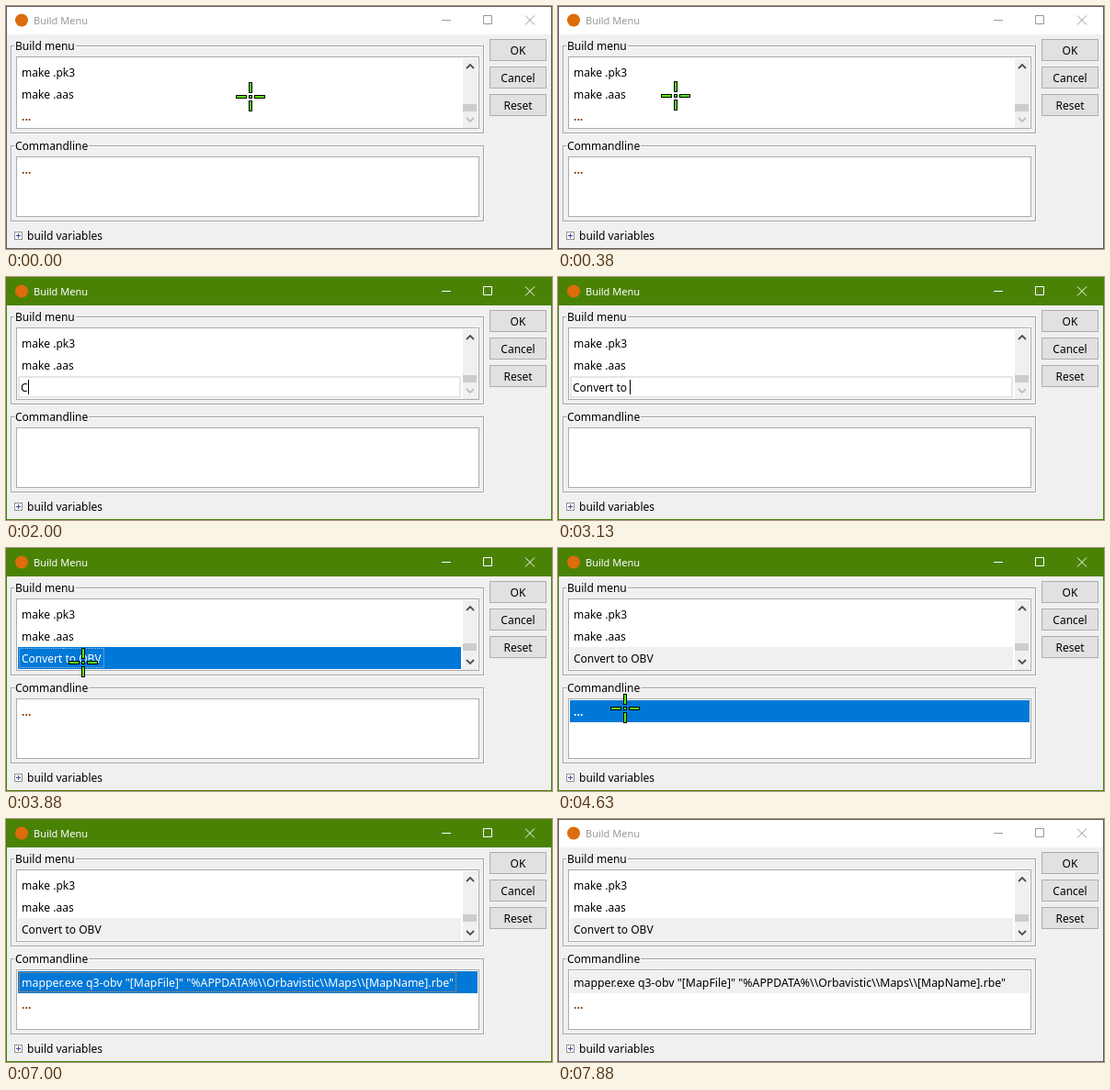
Animation, 594 px wide and 265 px high, one loop 8010 ms. Source, as an HTML page:

```html
<!DOCTYPE html>
<html lang="en">
<head>
<meta charset="utf-8">
<title>Build Menu</title>
<style>
html, body { margin: 0; width: 100%; height: 100%; overflow: hidden; }
svg { display: block; width: 594px; height: 265px; background: #f0f0f0; font: 12px "Noto Sans", "Open Sans", sans-serif; }
rect { shape-rendering: crispEdges; }
.mid { text-anchor: middle; }

.bar { fill: #fff; }
.edge { fill: none; stroke: #5c5c60; }
.name { fill: #999; font-size: 11px; }
.ctl { fill: none; stroke: #999; }
.on .bar { fill: #4a8206; }
.on .edge { stroke: #4a8206; }
.on .name { fill: #fff; }
.on .ctl { stroke: #fff; }

.etch { fill: none; stroke: #a3a3a3; }
.etch.lit { stroke: #fff; }
.gap { fill: #f0f0f0; }
.list { fill: #fff; stroke: #a9abb0; }
.btn { fill: #e1e1e1; stroke: #adadad; }
.arrow { fill: none; stroke: #505050; stroke-width: 1.8; }
.arrow.off { stroke: #bfbfbf; }

.bg { fill: none; }
.ring, .caret { display: none; }
.ring rect, rect.ring { fill: none; }
.dots { fill: #853c00; font-weight: bold; }
.pick .bg { fill: #0078d7; }
.pick text { fill: #fff; }
.dim .bg { fill: #f0f0f0; }
.edit .bg { fill: #fff; stroke: #e6e6e6; stroke-width: 2; }
.edit .caret { display: inline; }
.focus .ring { display: inline; stroke-dasharray: 1 1; }
.cmd text { font-size: 12.3px; }
</style>
</head>
<body>
<svg viewBox="0 0 594 265">
  <g id="win">
    <rect class="bar" width="594" height="31"/>
    <circle cx="17" cy="15.5" r="7" fill="#dc6c0c"/>
    <text class="name" x="30" y="20">Build Menu</text>
    <path class="ctl" d="M474 15.5h10M519.5 10.5h9v9h-9zM565 10.5l10 10m0-10l-10 10"/>
    <rect class="edge" x=".5" y=".5" width="593" height="264"/>
  </g>
  <g id="body"></g>
  <g id="rows"></g>
  <g id="pointer"></g>
</svg>
<script>
const $ = id => document.getElementById(id);

function add(parent, tag, attrs, text) {
  const el = document.createElementNS('http://www.w3.org/2000/svg', tag);
  for (const k in attrs) el.setAttribute(k, attrs[k]);
  if (text) el.textContent = text;
  return parent.appendChild(el);
}

const rect = (parent, cls, x, y, width, height) =>
  add(parent, 'rect', { class: cls, x, y, width, height });

// Static parts of the dialog
const body = $('body');

function group(label, y, h) {
  rect(body, 'etch lit', 6.5, y + 1.5, 514, h);
  rect(body, 'etch', 5.5, y + 0.5, 514, h);
  const gap = rect(body, 'gap', 9, y - 4, 0, 10);
  const text = add(body, 'text', { x: 10, y: y + 5 }, label);
  gap.setAttribute('width', text.getComputedTextLength() + 2);
  rect(body, 'list', 11.5, y + 12.5, 503, h - 17);
}

group('Build menu', 43, 95);
group('Commandline', 152, 82);

['OK', 'Cancel', 'Reset'].forEach((label, i) => {
  rect(body, 'btn', 526.5, 36.5 + i * 30, 61, 23);
  add(body, 'text', { class: 'mid', x: 557, y: 53 + i * 30 }, label);
});

rect(body, 'gap', 497, 57, 16, 76);
const thumb = add(body, 'rect', { x: 497, width: 15, height: 8, fill: '#cdcdcd' });
add(body, 'path', { class: 'arrow', d: 'M501 68l4-4 4 4' });
const down = add(body, 'path', { d: 'M501 122l4 4 4-4' });

add(body, 'rect', { x: 9.5, y: 246.5, width: 8, height: 8, fill: '#fff', stroke: '#919191' });
add(body, 'path', { d: 'M11 250.5h5M13.5 248v5', stroke: '#3c50a0' });
add(body, 'text', { x: 23, y: 255 }, 'build variables');

// List rows: a state is a set of class names plus the text
function makeRow(y, width, kind, ringColor) {
  const g = add($('rows'), 'g', {});
  const bg = rect(g, 'bg', 13, y, width, 24);
  const label = add(g, 'text', { y: y + 17 });
  const ring = rect(g, 'ring', 14.5, y + 1.5, 0, 21);
  ring.setAttribute('stroke', ringColor);
  const caret = rect(g, 'caret', 16, y + 4, 1, 16);
  let last;
  return (text, mode = '') => {
    if (last === text + mode) return;
    last = text + mode;
    const editing = mode === 'edit';
    const inset = editing ? 1 : 0;
    g.setAttribute('class', kind + ' ' + mode);
    bg.setAttribute('x', 13 + inset);
    bg.setAttribute('y', y + inset);
    bg.setAttribute('width', width - 2 * inset);
    bg.setAttribute('height', 24 - 2 * inset);
    label.setAttribute('class', text === '...' ? 'dots' : '');
    label.setAttribute('x', editing ? 16 : 17);
    label.textContent = text.replace(/ /g, '\u00a0');
    const w = text ? label.getComputedTextLength() : 0;
    ring.setAttribute('width', w + 5);
    caret.setAttribute('x', Math.round(16 + w));
  };
}

makeRow(60, 482, 'menu', 'none')('make .pk3');
const aasRow = makeRow(84, 482, 'menu', 'none');
const itemRow = makeRow(108, 482, 'menu', '#9fc4e6');
const cmdRow = makeRow(166, 500, 'cmd', '#ff8728');
const nextRow = makeRow(190, 500, 'cmd', 'none');

// Crosshair pointer centred on 0,0
const pointer = $('pointer');
for (const [x, y, w, h] of [[-16, -2, 12, 4], [4, -2, 12, 4], [-2, -16, 4, 12], [-2, 4, 4, 12], [-2, -2, 4, 4]]) {
  rect(pointer, '', x, y, w, h);
  add(pointer, 'rect', { x: x + 1, y: y + 1, width: w - 2, height: h - 2, fill: '#5cf010' });
}

const ITEM = 'Convert to OBV';
const CMD = 'mapper.exe q3-obv "[MapFile]" "%APPDATA%\\\\Orbavistic\\\\Maps\\\\[MapName].rbe"';
const type = text => ({ item: [text, 'edit'] });

// Each step changes only the fields it names
const steps = [
  [0, { on: false, at: [266, 99], aas: '', item: ['...'], cmd: ['...'], next: '', end: false }],
  [130, { at: [244, 98] }],
  [250, { at: [190, 97] }],
  [380, { at: [128, 98] }],
  [500, { at: [92, 100] }],
  [630, { on: true, at: [85, 101], aas: 'pick', cmd: ['mapper.exe aas "[MapFile]"'], next: '...' }],
  [880, { at: [84, 125], aas: '', item: ['...', 'pick'], cmd: [''], next: '' }],
  [1500, type('')],
  [1630, { at: null }],
  [2000, type('C')],
  [2130, type('Con')],
  [2250, type('Conve')],
  [2380, type('Convert')],
  [2500, type('Convert to')],
  [2630, type('Convert to O')],
  [2750, type('Convert ')],
  [3000, type('Convert to')],
  [3130, type('Convert to ')],
  [3380, type('Convert to O')],
  [3500, type('Convert to OB')],
  [3750, type(ITEM)],
  [3880, { at: [84, 125], item: [ITEM, 'pick focus'], cmd: ['...'], end: true }],
  [4380, { at: [81, 143] }],
  [4500, { at: [74, 177] }],
  [4630, { at: [73, 175], item: [ITEM, 'dim'], cmd: ['...', 'pick'] }],
  [5380, { cmd: ['', 'edit'] }],
  [5500, { at: null }],
  [5750, { cmd: [CMD, 'edit'] }],
  [6130, { at: [73, 175], cmd: [CMD, 'pick focus'], next: '...' }],
  [6880, { at: [98, 206] }],
  [7000, { at: null }],
  [7880, { on: false, cmd: [CMD, 'dim'] }]
];

function draw() {
  const t = performance.now() % 8010;
  const s = {};
  for (const [start, change] of steps) if (start <= t) Object.assign(s, change);

  $('win').setAttribute('class', s.on ? 'on' : '');
  aasRow('make .aas', s.aas);
  itemRow(...s.item);
  cmdRow(...s.cmd);
  nextRow(s.next);
  thumb.setAttribute('y', s.end ? 104 : 107);
  down.setAttribute('class', s.end ? 'arrow' : 'arrow off');
  pointer.style.display = s.at ? '' : 'none';
  if (s.at) pointer.setAttribute('transform', `translate(${s.at})`);
  requestAnimationFrame(draw);
}
draw();
</script>
</body>
</html>
```
